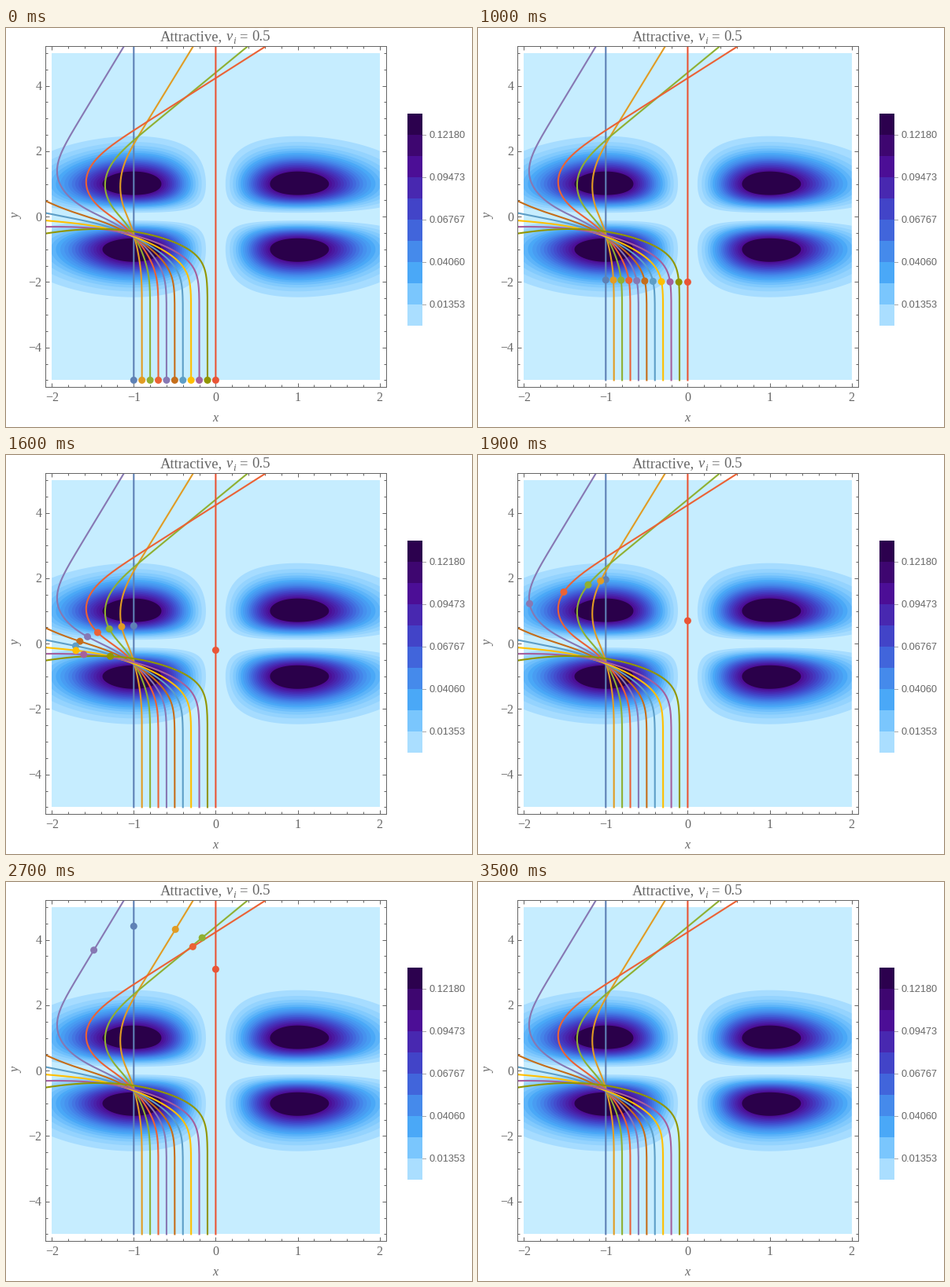
A matplotlib script that plays this animation: 592 px wide and 508 px high, repeating every 5 s.

```python
import numpy as np
import matplotlib.pyplot as plt
from matplotlib.animation import FuncAnimation
from matplotlib.colors import LinearSegmentedColormap
from matplotlib.patches import Rectangle

W, H, DPI = 592, 508, 64
PT = 72 / DPI                      # points per pixel
GRAY = "#666666"
FRAMES, LAST, STEPS, DT = 50, 35, 30, 0.02
MASS = 0.5
CX, CY, SX, SY = 266.4, 240.2, 104.1, 41.64    # plot centre and scale, pixels

SEA = LinearSegmentedColormap.from_list("sea", [
    (0.00, "#c6edff"), (0.02, "#c6edff"), (0.05, "#aadeff"),
    (0.15, "#7ac6fd"), (0.25, "#4aa8f7"), (0.35, "#458aeb"),
    (0.45, "#4165db"), (0.55, "#4244c8"), (0.65, "#4828b0"),
    (0.75, "#4c0e96"), (0.85, "#3e0670"), (0.95, "#2c014e"),
    (1.00, "#2a004a")], N=1024)

COLORS = ["#5e81b5", "#e19c24", "#8fb032", "#eb6235", "#8778b3", "#c56e1a",
          "#5d9ec7", "#ffbf00", "#a5609d", "#929600", "#e95536"]


def well(x, y):
    return x**2 * y**2 * np.exp(-x**2 - y**2)


def deriv(s):
    x, y, vx, vy = s
    e = 2 * x * y * np.exp(-x**2 - y**2) / MASS
    return np.array([vx, vy, e * y * (1 - x**2), e * x * (1 - y**2)])


def integrate(s, n):
    """Fourth-order Runge-Kutta path of all particles at once."""
    path = [s[:2]]
    for _ in range(n):
        a = deriv(s)
        b = deriv(s + DT / 2 * a)
        c = deriv(s + DT / 2 * b)
        d = deriv(s + DT * c)
        s = s + DT / 6 * (a + 2 * b + 2 * c + d)
        path.append(s[:2])
    return np.array(path)


x0 = np.linspace(-1, 0, 11)
start = np.array([x0, np.full(11, -5.0), np.zeros(11), np.full(11, 0.5)])
path = integrate(start, LAST * STEPS)

fig = plt.figure(figsize=(W / DPI, H / DPI), dpi=DPI, facecolor="white")

# page in pixel coordinates: text and legend
page = fig.add_axes([0, 0, 1, 1])
page.set(xlim=(0, W), ylim=(H, 0))
page.axis("off")


def label(x, y, text, size, ha="left", font="Liberation Serif", **kw):
    page.text(x, y, text, size=size * PT, ha=ha, family=font, color=GRAY,
              **{"va": "baseline", **kw})


label(196, 16.5, "Attractive,", 18.67)
label(280, 16.5, "v", 18.67, style="italic")
label(288, 20, "i", 13.3, style="italic")
label(296, 16.5, "=", 18.67)
label(312, 16.5, "0.5", 18.67)
label(266, 501, "x", 16, "center", style="italic")
label(13, 239.5, "y", 16, "center", style="italic", rotation=90, va="center")

for k in range(-2, 3):
    sign = "\u2212" if k < 0 else ""
    label(CX + SX * k, 475, f"{sign}{abs(k)}", 16, "center")
    label(45.5, CY + 5.5 - 2 * SY * k, f"{sign}{abs(2 * k)}", 16, "right")

for k in range(10):
    page.add_patch(Rectangle((510, 352 - 27 * k), 18.5, 27, lw=0,
                             color=SEA(0.05 + 0.1 * k), antialiased=False))
for k in range(1, 10, 2):
    y = 379 - 27 * k
    page.plot([529, 533], [y, y], color="#a8a8a8", lw=PT)
    label(537, y + 4, f"{k * np.exp(-2) / 10:.5f}", 12.8,
          font="Liberation Sans")

# plot
left, right, top, bottom = 49.5, 482.5, 23.5, 456.5
ax = fig.add_axes([left / W, 1 - bottom / H, (right - left) / W,
                   (bottom - top) / H])
ax.set_xticks(range(-2, 3))
ax.set_yticks(range(-4, 5, 2))
ax.set_xticks(np.arange(-10, 11) / 5, minor=True)
ax.set_yticks(np.arange(-10, 11) / 2, minor=True)
ax.tick_params(which="both", direction="in", top=True, right=True, color=GRAY,
               width=PT, labelbottom=False, labelleft=False)
ax.tick_params(which="major", length=5 * PT)
ax.tick_params(which="minor", length=3 * PT)
for spine in ax.spines.values():
    spine.set(color=GRAY, linewidth=PT)

# nested bands; everything above the top level is clipped to the darkest tone
ax.add_patch(Rectangle((-2, -5), 4, 10, lw=0, color=SEA(0.0), zorder=0))
gx, gy = np.meshgrid(np.linspace(-2, 2, 241), np.linspace(-5, 5, 481))
depth = well(gx, gy)
for k in range(1, 21):
    tone = SEA((k + 0.5) / 26) if k < 20 else SEA(1.0)
    ax.contourf(gx, gy, depth, levels=[0.0052 * k, 1], colors=[tone],
                antialiased=True, zorder=1)

for i, color in enumerate(COLORS):
    ax.plot(path[:, 0, i], path[:, 1, i], color=color, lw=2.1 * PT, zorder=2)
dots = ax.scatter(*path[0], s=(9 * PT)**2, c=COLORS, lw=0, zorder=3)
ax.set(xlim=((left - CX) / SX, (right - CX) / SX),
       ylim=((CY - bottom) / SY, (CY - top) / SY))


def update(frame):
    dots.set_offsets(path[min(frame, LAST) * STEPS].T)
    return dots,


anim = FuncAnimation(fig, update, frames=FRAMES, interval=100, repeat=True,
                     repeat_delay=0, blit=False)
plt.show()
```
